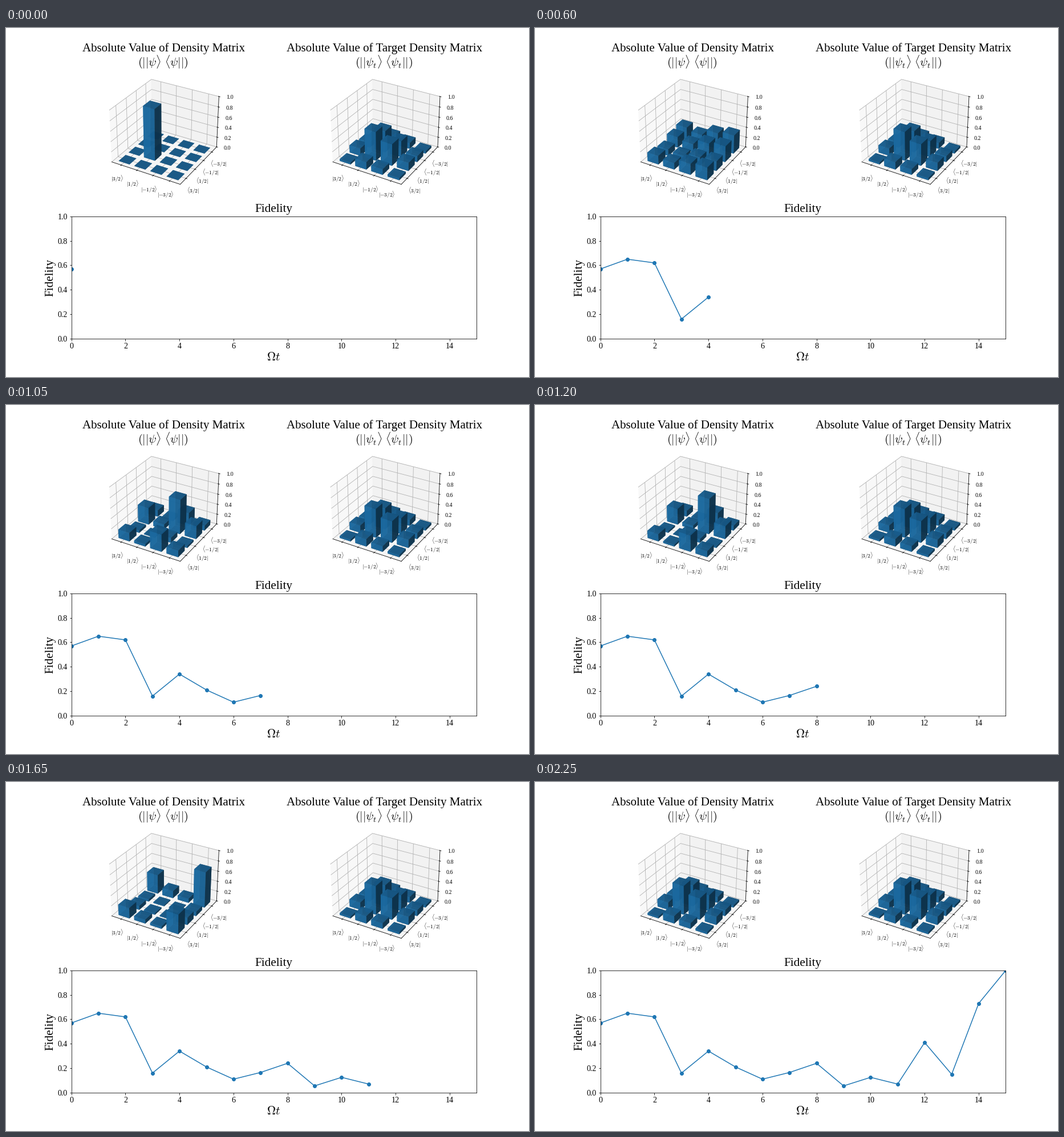
A matplotlib script for the animation above (2.4 s loop, 917 px wide and 611 px high).

```python
import numpy as np
import matplotlib.pyplot as plt
from matplotlib.animation import FuncAnimation

W, H, DPI = 917, 611, 72
STEPS = 16
BLUE = "#1f77b4"
BAR = 0.7
PAD = 0.27  # free space between the outer bars and the walls

plt.rcParams.update({
    "font.family": "Liberation Serif",
    "mathtext.fontset": "cm",
})

# Level populations in percent at a few steps; the rest is interpolated
KEYS = {
    0: (0, 100, 0, 0),
    2: (1.6, 26.5, 9.6, 54.5),
    5: (24.5, 1.7, 36, 27.5),
    6: (19, 2, 66, 10),
    8: (14.5, 0.8, 69.7, 9.6),
    11: (20.7, 2.9, 1, 70),
    13: (11.2, 28, 12.6, 39.7),
    15: (3.8, 56.8, 31.9, 4.4),
}
FIDELITY = np.array([57, 65, 62, 16, 34, 21, 11, 16.5,
                     24, 5.5, 12.5, 7, 41, 15, 73, 100]) / 100
LEVELS = ["3/2", "1/2", "{-}1/2", "{-}3/2"]

fig = plt.figure(figsize=((W + 0.001) / DPI, (H + 0.001) / DPI), dpi=DPI,
                 facecolor="white")


def density(step):
    """Absolute values of the pure-state density matrix."""
    levels = np.array(list(KEYS.values())).T / 100
    amps = np.sqrt([np.interp(step, list(KEYS), p) for p in levels])
    return np.outer(amps, amps)


def label(x, y, text, size=21, **kw):
    """Centred text with its baseline at a pixel position from the top left."""
    fig.text(x / W, 1 - y / H, text, fontsize=size, ha="center",
             va="baseline", **kw)


def fix_limits(ax):
    ax.set_xlim(-PAD, 3 + BAR + PAD)
    ax.set_ylim(-PAD, 3 + BAR + PAD)
    ax.set_zlim(0, 1)


def matrix_axes(slot):
    ax = fig.add_subplot(2, 2, slot, projection="3d")
    ticks = np.arange(4) + BAR / 2
    ax.set_xticks(ticks, [rf"$|{s}\rangle$" for s in LEVELS])
    ax.set_yticks(ticks, [rf"$\langle {s}|$" for s in LEVELS])
    ax.set_zticks(np.linspace(0, 1, 6), [f"{k / 5:.1f}" for k in range(6)])
    for axis, size in zip("xyz", (9.4, 9.4, 10)):
        ax.tick_params(axis=axis, labelsize=size)
    fix_limits(ax)
    return ax


def draw_bars(ax, step):
    x, y = np.indices((4, 4))
    bars = ax.bar3d(x.ravel(), y.ravel(), np.zeros(16), BAR, BAR,
                    density(step).ravel(), color=BLUE, alpha=0.85)
    fix_limits(ax)
    return bars


state_ax = matrix_axes(1)
target_ax = matrix_axes(2)
draw_bars(target_ax, STEPS - 1)

plot_ax = fig.add_subplot(2, 1, 2)
plot_ax.set_xlim(0, STEPS - 1)
plot_ax.set_ylim(0, 1)
plot_ax.set_xticks(range(0, STEPS - 1, 2))
plot_ax.tick_params(labelsize=14)
line, = plot_ax.plot([], [], "o-", color=BLUE)

label(276.3, 41.3, "Absolute Value of Density Matrix")
label(275.5, 66, r"$(||\psi\rangle\ \langle\psi||)$", 20)
label(663.7, 41.3, "Absolute Value of Target Density Matrix")
label(663, 66, r"$(||\psi_t\rangle\ \langle\psi_t||)$", 20)
label(469.7, 322, "Fidelity")
label(82, 437, "Fidelity", rotation=90, rotation_mode="anchor")
label(469, 581.5, r"$\Omega t$")

shown = []


def update(step):
    while shown:
        shown.pop().remove()
    shown.append(draw_bars(state_ax, step))
    line.set_data(range(step + 1), FIDELITY[:step + 1])
    return shown + [line]


anim = FuncAnimation(fig, update, frames=STEPS, interval=150,
                     repeat=True, repeat_delay=0, blit=False)
plt.show()
```
